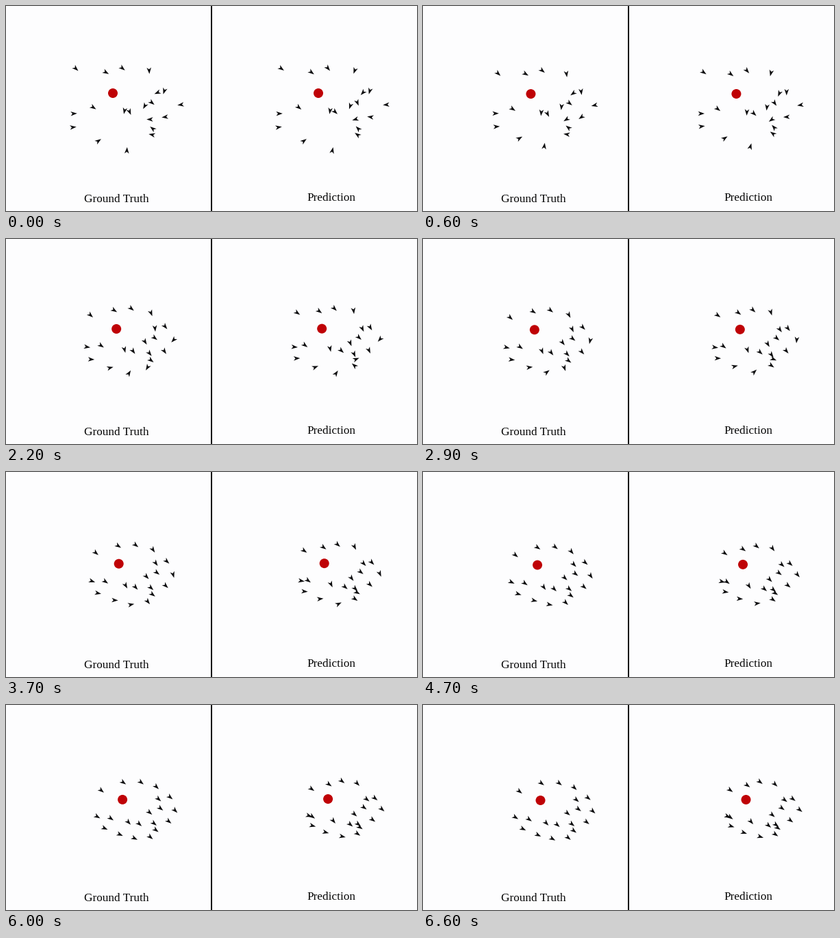
Recreate the animation shown at these times as a matplotlib script. Size 600 px wide and 301 px high, loop 6700 ms.

```python
import matplotlib.pyplot as plt
import numpy as np
from matplotlib.animation import FuncAnimation
from matplotlib.collections import PolyCollection

W, H, DPI = 600, 301, 64
FRAMES, STEP = 67, 100
END = (FRAMES - 1) * STEP / 1000

# Shared starting positions of the flock
START = np.array([
    (102, 92), (146, 97.5), (170, 91.5), (209, 95), (231, 125),
    (221, 127.3), (213, 142), (202.5, 147), (255, 145), (232, 163),
    (210, 166.5), (214, 180), (213, 189), (127.5, 149), (173, 154),
    (180.5, 155.5), (99, 158), (98, 178), (135, 198), (176.5, 212)])

# Final x, final y, settling time in seconds
TRUTH = np.array([
    (141, 127, 2), (173, 115, 2.8), (199, 115, 3), (221, 121.5, 2.1),
    (241, 136.5, 2), (224, 139.3, 2), (227, 153, 2), (211, 159, 2.2),
    (248, 156, 2), (239, 172, 2), (217.5, 175, 2), (220.2, 184.7, 1.4),
    (212, 195, 1.9), (155, 168, 4), (180, 173.5, 2.8), (196, 176, 2.5),
    (135, 165, 2), (146, 182, 2.3), (168, 191, 2.1), (189, 196.5, 2)])

PREDICTION = np.array([
    (148.5, 125, 3), (173.5, 118, 4), (192, 113, 2.2), (214, 116.5, 2.4),
    (240, 138, 2.2), (228, 139.5, 2), (224, 151.5, 2.5), (210, 161.5, 2.5),
    (250, 154, 2), (236.5, 169.5, 2.3), (215.5, 176, 2), (218, 180.5, 2),
    (214.5, 190, 2), (148.7, 165, 2.2), (179, 171.5, 4), (204.5, 177, 6),
    (144.7, 163.5, 3.3), (150, 178, 3), (168.5, 187.5, 2.5),
    (192.5, 193.5, 2.5)])

DART = np.array([(4.8, 0), (-4.6, 3.3), (-2, 0), (-4.6, -3.3)])
LEADER = np.array([156, 128])


class Flock:
    """Birds whose velocity decays towards the leader's steady drift."""

    def __init__(self, ax, goals, drift, left):
        self.offset = np.array([left, 0])
        self.drift = np.array(drift) / END
        self.tau = goals[:, 2:]
        gap = goals[:, :2] - START - self.drift * END
        self.reach = gap / (1 - np.exp(-END / self.tau))
        self.birds = PolyCollection([], facecolors="#0b0b0d", linewidths=0)
        ax.add_collection(self.birds)
        self.leader = plt.Circle(LEADER + self.offset, 7, fc="#bf0206", lw=0)
        ax.add_patch(self.leader)

    def move(self, t):
        fade = np.exp(-t / self.tau)
        pos = START + self.drift * t + self.reach * (1 - fade) + self.offset
        vel = self.drift + self.reach / self.tau * fade
        ux, uy = (vel / np.linalg.norm(vel, axis=1, keepdims=True)).T
        turn = np.array([[ux, uy], [-uy, ux]]).transpose(2, 0, 1)
        self.birds.set_verts(DART @ turn + pos[:, None])
        self.leader.center = LEADER + self.drift * t + self.offset


fig = plt.figure(figsize=(W / DPI, H / DPI), dpi=DPI, facecolor="#fdfdfe")
ax = fig.add_axes([0, 0, 1, 1])
ax.set(xlim=(0, W), ylim=(H, 0))
ax.axis("off")

ax.add_patch(plt.Rectangle((299, 0), 2, H, fc="#0a0a0a", lw=0))
for x, y, label in [(161.5, 288, "Ground Truth"), (474.5, 286.5, "Prediction")]:
    ax.text(x, y, label, ha="center", va="baseline", color="#050505",
            family="Liberation Serif", size=17.3 * 72 / DPI)

flocks = [Flock(ax, TRUTH, (15.5, 12), 0),
          Flock(ax, PREDICTION, (15.5, 11), 300)]


def update(i):
    for flock in flocks:
        flock.move(i * STEP / 1000)
    return []


anim = FuncAnimation(fig, update, frames=FRAMES, interval=STEP,
                     repeat=True, repeat_delay=0)
plt.show()
```
